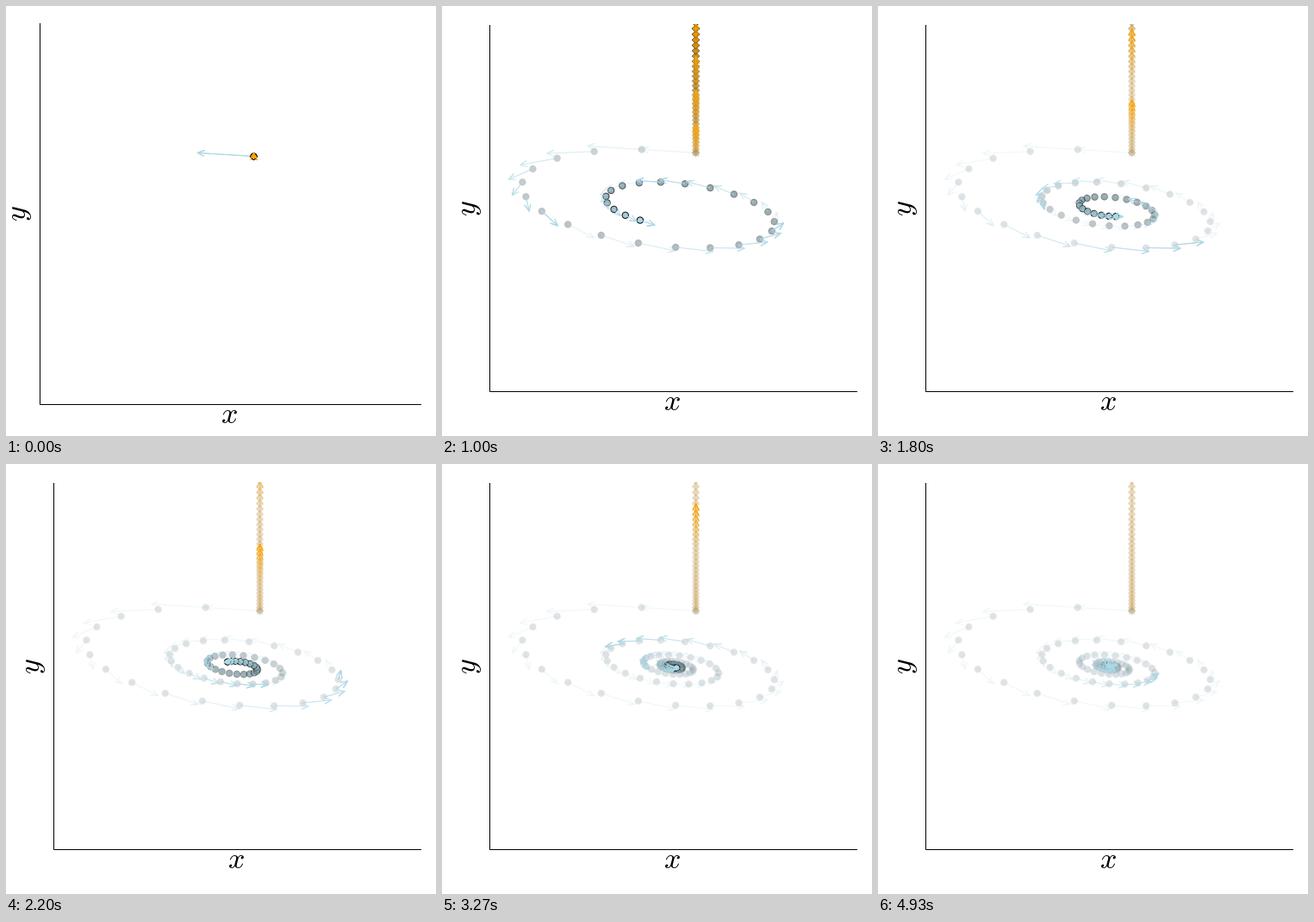
Animation of 499x499 px, one loop 4.99 s. Source, as a matplotlib script:

```python
import numpy as np
import matplotlib.pyplot as plt
from matplotlib.animation import FuncAnimation
from matplotlib.collections import LineCollection
from matplotlib.colors import to_rgb
from matplotlib.patches import Rectangle

SIZE, DPI = 499, 100
PT = 72 / DPI                      # points per pixel
FRAMES, LOOP_MS = 75, 4990
STEPS_PER_FRAME = 2
START = np.array([26.0, 64.6])
SPIRAL = np.array([[0.82, -0.9], [0.1, 1.02]])
SHEAR = np.array([[1.0, 0.0], [0.1, 1.02]])


def orbit(matrix, count):
    """Points of the linear map and the step that led to each of them."""
    pts = [START]
    for _ in range(count):
        pts.append(matrix @ pts[-1])
    pts = np.array(pts)
    steps = np.diff(pts, axis=0)
    return pts, np.vstack([steps[:1], steps])


def rgba(color, alpha):
    out = np.empty((len(alpha), 4))
    out[:, :3] = to_rgb(color)
    out[:, 3] = alpha
    return out


def arrow_lines(tail, vec, head=8.0, half=3.5):
    tip = tail + vec
    unit = vec / np.linalg.norm(vec, axis=1, keepdims=True)
    side = unit[:, ::-1] * [-1, 1]
    back = tip - head * unit
    return np.stack([tail, tip, back + half * side, tip, back - half * side], axis=1)


fig = plt.figure(figsize=(SIZE / DPI, SIZE / DPI), dpi=DPI, facecolor="white")
ax = fig.add_axes([0, 0, 1, 1])
ax.set(xlim=(0, SIZE), ylim=(SIZE, 0))
ax.axis("off")

clip = Rectangle((55, 21), 427, 427, transform=ax.transData)
frame_line, = ax.plot([], [], color="black", lw=PT, solid_joinstyle="miter")
label = dict(fontsize=34 * PT, ha="center", va="center", math_fontfamily="cm")
x_label = ax.text(0, 0, "$x$", **label)
y_label = ax.text(0, 0, "$y$", rotation=90, **label)


class Trail:
    """Fading markers with a velocity arrow on each."""

    def __init__(self, matrix, color, marker, outer, inner, z):
        self.color = color
        self.pts, self.vec = orbit(matrix, STEPS_PER_FRAME * FRAMES)
        self.sizes = (np.array([outer, inner]) * PT) ** 2
        self.marks = ax.scatter([], [], marker=marker, linewidths=0, zorder=z)
        self.arrows = LineCollection([], linewidths=PT, joinstyle="round", zorder=z + 1)
        ax.add_collection(self.arrows, autolim=False)
        for artist in (self.marks, self.arrows):
            artist.set_clip_path(clip)

    def draw(self, n, center, scale):
        flip = np.array([scale, -scale])
        pos = center + self.pts[:n] * flip
        alpha = np.maximum(0.1, 0.94 ** np.arange(n - 1, -1, -1.0))

        # a black disc under each coloured one makes the rim
        colors = np.empty((2 * n, 4))
        colors[0::2] = rgba("black", alpha)
        colors[1::2] = rgba(self.color, alpha)
        self.marks.set_offsets(np.repeat(pos, 2, axis=0))
        self.marks.set_sizes(np.tile(self.sizes, n), DPI)
        self.marks.set_facecolor(colors)

        # arrow opacity runs through the same ramp four times as fast;
        # each arrow is stroked twice
        cycled = alpha[(4 * np.arange(n) + 1) % n]
        lines = arrow_lines(pos, self.vec[:n] * flip)
        self.arrows.set_segments(np.repeat(lines, 2, axis=0))
        self.arrows.set_color(rgba(self.color, np.repeat(cycled, 2)))


trails = [
    Trail(SPIRAL, "lightblue", "o", 8.3, 6.3, 3),
    Trail(SHEAR, "orange", "D", 6.8, 5.4, 5),
]


def update(i):
    # the plot area settles after the first frame
    left, top, bottom = (39, 20, 462) if i == 0 else (55, 22, 447)
    right = 481
    cx, cy = (left + right + 1) / 2, (top + bottom + 1) / 2

    frame_line.set_data([left, left, right], [top, bottom, bottom])
    x_label.set_position((cx - 1.5, bottom + 12.4))
    y_label.set_position((left - 23.7, cy - 0.8))
    for trail in trails:
        trail.draw(STEPS_PER_FRAME * i + 1, np.array([cx, cy]), (right - left) / 426)
    return []


anim = FuncAnimation(fig, update, frames=FRAMES, interval=LOOP_MS / FRAMES,
                     init_func=lambda: update(0), repeat=True, repeat_delay=0)
plt.show()
```
